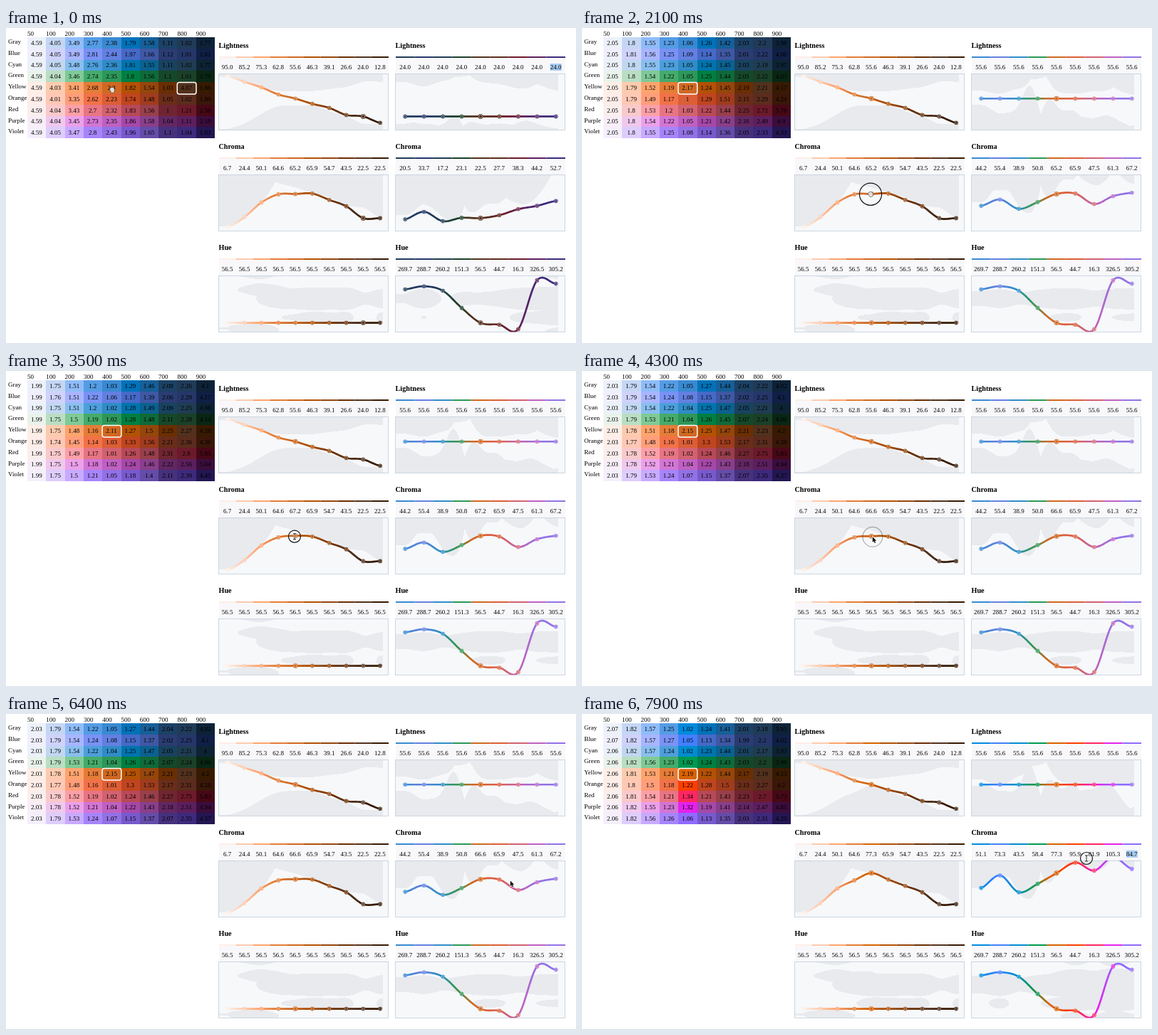
Write an HTML page with a canvas that moves like this. It is 800 by 443 pixels and loops after 8000 ms.

```html
<!DOCTYPE html>
<html lang="en">
<head>
<meta charset="utf-8">
<title>Palette editor</title>
<style>
html, body { margin: 0; width: 100%; height: 100%; overflow: hidden; background: #fff; }
canvas { display: block; width: 800px; height: 443px; }
</style>
</head>
<body>
<canvas id="stage" width="800" height="443"></canvas>
<script>
const LOOP = 8000;
const ctx = document.getElementById('stage').getContext('2d');
const shade = document.createElement('canvas');
shade.width = 800;
shade.height = 443;
const shadeCtx = shade.getContext('2d');

const names = ['Gray', 'Blue', 'Cyan', 'Green', 'Yellow', 'Orange', 'Red', 'Purple', 'Violet'];
const steps = [50, 100, 200, 300, 400, 500, 600, 700, 800, 900];
const light = [95, 85.2, 75.3, 62.8, 55.6, 46.3, 39.1, 26.6, 24, 12.8];
const hues = [269.7, 288.7, 260.2, 151.3, 56.5, 44.7, 16.3, 326.5, 305.2];
const yellow = [6.7, 24.4, 50.1, 64.6, 65.2, 65.9, 54.7, 43.5, 22.5, 22.5];
const mid = [44.2, 55.4, 38.9, 50.8, 65.2, 65.9, 47.5, 61.3, 67.2];
const dark = [20.5, 33.7, 17.2, 23.1, 22.5, 27.7, 38.3, 44.2, 52.7];

const charts = [
  { title: 'Lightness', max: 100 },
  { title: 'Chroma', max: 100 },
  { title: 'Hue', max: 360 }
];
const TABLE = { x: 30, y: 13, w: 26.3, h: 15.8 };
const PITCH = 141.8, WIDTH = 238, HEIGHT = 79.6;

const mix = (a, b, p) => a + (b - a) * p;
const clamp = (v, lo, hi) => Math.min(hi, Math.max(lo, v));
const ramp = (t, a, b) => clamp((t - a) / (b - a), 0, 1);
const ease = p => p * p * (3 - 2 * p);

function track(keys, t) {
  const i = keys.findIndex(k => k[0] > t);
  if (i < 0) return keys[keys.length - 1].slice(1);
  if (!i) return keys[0].slice(1);
  const a = keys[i - 1], b = keys[i], p = ease(ramp(t, a[0], b[0]));
  return a.slice(1).map((v, j) => mix(v, b[j + 1], p));
}

// CIE LCH (D65) to linear sRGB
function linear(l, c, h) {
  const rad = h * Math.PI / 180;
  const inv = f => f > 6 / 29 ? f * f * f : (f - 4 / 29) * 108 / 841;
  const fy = (l + 16) / 116;
  const x = 0.95047 * inv(fy + c * Math.cos(rad) / 500);
  const y = inv(fy);
  const z = 1.08883 * inv(fy - c * Math.sin(rad) / 200);
  return [
    3.2406 * x - 1.5372 * y - 0.4986 * z,
    -0.9689 * x + 1.8758 * y + 0.0415 * z,
    0.0557 * x - 0.204 * y + 1.057 * z
  ];
}

const encode = lch => linear(...lch).map(v => {
  v = clamp(v, 0, 1);
  return v <= 0.0031308 ? 12.92 * v : 1.055 * v ** (1 / 2.4) - 0.055;
});
const css = lch => `rgb(${encode(lch).map(v => Math.round(v * 255))})`;
const shown = lch => linear(...lch).every(v => v > -0.0001 && v < 1.0001);

// Brightness relative to white
function luma(lch) {
  const [r, g, b] = encode(lch);
  return (0.2126 * r + 0.7152 * g + 0.0722 * b - 0.008) / 0.992;
}

// Highest chroma that sRGB can show
function maxChroma(l, h) {
  let lo = 0, hi = 150;
  for (let i = 0; i < 16; i++) {
    const c = (lo + hi) / 2;
    if (shown([l, c, h])) lo = c;
    else hi = c;
  }
  return lo;
}
const limits = hues.map(h => maxChroma(light[4], h));

// Catmull-Rom value at fractional index u
function spline(v, u) {
  const last = v.length - 1;
  u = clamp(u, 0, last);
  const i = Math.min(Math.floor(u), last - 1), p = u - i;
  const a = v[i], b = v[i + 1];
  const m = (b - (v[i - 1] ?? a)) / 2, n = ((v[i + 2] ?? b) - a) / 2;
  return a + p * (m + p * (3 * (b - a) - 2 * m - n + p * (2 * (a - b) + m + n)));
}

function text(s, x, y, align = 'center', font = '9px') {
  ctx.font = `${font} "Liberation Serif", serif`;
  ctx.textAlign = align;
  ctx.textBaseline = 'alphabetic';
  ctx.fillStyle = '#000';
  ctx.fillText(s, x, y);
}

function stateAt(t) {
  const sel = t < 250 ? 8 : 4;
  const pull = 44 * ease(ramp(t, 6600, 7850));
  // Yellow chroma and the selection's contrast with white
  const [tuned, picked] = track([
    [2150, 65.2, 2.17], [3300, 67.2, 2.11], [3700, 67.2, 2.11],
    [4200, 66.6, 2.15], [6600, 66.6, 2.15], [7850, 66.6, 2.19]
  ], t);
  const white = sel === 8 ? 4.87 : picked;
  const live = mid.map((v, r) => Math.min((r === 4 ? tuned : v) + pull, limits[r]));
  const chroma = (r, c) => {
    if (c === 4) return live[r];
    if (r === 4) return yellow[c];
    if (c > 7) return dark[r] * (c > 8 ? 0.8 : 1);
    const v = mid[r] * yellow[c] / yellow[4];
    return c === 7 ? (v + dark[r]) / 2 : v;
  };
  const lch = (r, c) => [light[c], chroma(r, c), hues[r]];
  const ratio = (r, c) => {
    if (r === 4 && c === sel) return white;
    const v = luma(lch(r, c)) * white;
    return Math.max(v, 1 / v);
  };
  const sides = [
    { x: 299, pts: steps.map((_, c) => lch(4, c)), sel },
    { x: 547, pts: names.map((_, r) => lch(r, sel)), sel: 4 }
  ];
  return { sel, lch, ratio, sides, marked: t < 250 || pull > 0, key: sel + live.join() };
}

function drawTable(s) {
  const { x: left, y: top, w, h } = TABLE;
  steps.forEach((n, c) => text(n, left + c * w, 10.7, 'left'));
  names.forEach((name, r) => {
    const y = top + r * h;
    text(name, 3, y + 9, 'left');
    steps.forEach((_, c) => {
      const x = left + c * w;
      ctx.fillStyle = css(s.lch(r, c));
      ctx.fillRect(Math.round(x), Math.round(y), Math.round(x + w) - Math.round(x), Math.round(y + h) - Math.round(y));
      text(String(+s.ratio(r, c).toFixed(2)), x + 12.8, y + 10.8);
    });
  });
  ctx.strokeStyle = '#fff';
  ctx.lineWidth = 1.5;
  ctx.beginPath();
  ctx.roundRect(left + s.sel * w - 0.1, top + 4 * h + 0.2, w + 0.4, h + 0.8, 3);
  ctx.stroke();
}

// Keep neighbouring hues on the short way round
const unwrap = list => list.reduce((out, h, i) => {
  if (i) h -= 360 * Math.round((h - out[i - 1]) / 360);
  return [...out, h];
}, []);

let shadeKey;
// Grey out every value that sRGB cannot show
function drawShade(s) {
  if (shadeKey === s.key) return;
  shadeKey = s.key;
  shadeCtx.clearRect(0, 0, 800, 443);
  shadeCtx.fillStyle = '#e8eaee';
  for (const side of s.sides) {
    const w = WIDTH / side.pts.length;
    const series = [0, 1, 2].map(k => side.pts.map(p => p[k]));
    series[2] = unwrap(series[2]);
    for (let x = 0; x < WIDTH - w / 2 + 3; x++) {
      const at = series.map(v => spline(v, x / w - 0.5));
      charts.forEach((chart, i) => {
        const probe = [...at], top = Math.round(64.6 + i * PITCH);
        let start = -1;
        for (let y = 0; y <= 79; y++) {
          probe[i] = chart.max * (1 - y / 79);
          const out = y < 79 && !shown(probe);
          if (out && start < 0) start = y;
          if (!out && start >= 0) {
            shadeCtx.fillRect(side.x + x, top + start, 1, y - start);
            start = -1;
          }
        }
      });
    }
  }
}

function drawChart(side, chart, i, marked) {
  const { x, pts } = side, n = pts.length, w = WIDTH / n;
  const top = 64.3 + i * PITCH, edge = Math.round(top);
  const vals = pts.map(p => p[i]);
  const px = k => x + (k + 0.5) * w;
  const py = v => top + HEIGHT * (1 - v / chart.max) - 0.4;
  const colors = pts.map(css);

  text(chart.title, x - 0.5, top - 36.3, 'left', 'bold 10.2px');
  ctx.fillStyle = '#f8f8fa';
  ctx.fillRect(x, edge - 22, WIDTH, 22);
  colors.forEach((c, k) => {
    ctx.fillStyle = c;
    ctx.fillRect(x + k * w, edge - 24, w, 2);
  });
  if (marked) {
    ctx.fillStyle = '#a8cdf3';
    ctx.fillRect(px(n - 1) - 8, top - 14.3, 16, 10);
  }
  vals.forEach((v, k) => text(v.toFixed(1), px(k) - 0.2, top - 6.2));

  ctx.fillStyle = '#f6f8fa';
  ctx.fillRect(x, edge, WIDTH, 80);
  ctx.drawImage(shade, x, edge, WIDTH, 80, x, edge, WIDTH, 80);
  ctx.strokeStyle = '#ccd6e0';
  ctx.lineWidth = 1;
  ctx.strokeRect(x - 0.5, edge + 0.5, WIDTH, 79);

  ctx.save();
  ctx.beginPath();
  ctx.rect(x, top, WIDTH, HEIGHT);
  ctx.clip();
  const grad = ctx.createLinearGradient(px(0), 0, px(n - 1), 0);
  colors.forEach((c, k) => grad.addColorStop(k / n, c));
  ctx.strokeStyle = grad;
  ctx.lineWidth = 2.7;
  ctx.beginPath();
  for (let u = 0; u <= n - 0.99; u += 0.05) ctx.lineTo(px(u), py(spline(vals, u)));
  ctx.stroke();
  vals.forEach((v, k) => {
    const r = k === side.sel ? 3.4 : 2.8;
    ctx.fillStyle = colors[k];
    ctx.beginPath();
    ctx.arc(px(k), py(v), r, 0, 7);
    ctx.fill();
    ctx.strokeStyle = 'rgba(255,255,255,.55)';
    ctx.lineWidth = 0.9;
    ctx.beginPath();
    ctx.arc(px(k), py(v), r - 1, 0, 7);
    ctx.stroke();
  });
  ctx.restore();
}

function glyph(d, x, y, fill, stroke, width) {
  const path = new Path2D(d);
  ctx.save();
  ctx.translate(x, y);
  ctx.lineWidth = width;
  ctx.strokeStyle = stroke;
  ctx.stroke(path);
  if (fill) {
    ctx.fillStyle = fill;
    ctx.fill(path);
  }
  ctx.restore();
}

function drawRing(t, x, y) {
  for (const [down, up] of [[2050, 4200], [6500, 9000]]) {
    if (t < down || t > up + 150) continue;
    const fade = ramp(t, up, up + 150);
    ctx.globalAlpha = 1 - fade;
    ctx.strokeStyle = '#111';
    ctx.lineWidth = 1.2;
    ctx.beginPath();
    ctx.arc(x, y, mix(18, 8.5, ramp(t, down, down + 200)) + 8 * fade, 0, 7);
    ctx.stroke();
    ctx.globalAlpha = 1;
  }
}

function drawCursor(t) {
  const [x, y] = track([
    [250, 149, 87], [1100, 346, 217], [1950, 405, 233.7], [2150, 405, 233.7],
    [3300, 405, 232.7], [3700, 405, 232.7], [4250, 405, 233.2], [5150, 710.5, 241],
    [6350, 707.8, 234], [6600, 708, 238], [7850, 708, 203]
  ], t);
  drawRing(t, x, y);
  if (t < 350 || (t > 1850 && t < 2250)) {
    glyph('M-3 0Q-4-2-2-2Q-2-4 0-3Q2-4 2-2Q4-2 3 1Q3 4 0 4Q-2 3-3 0Z', x, y, '#ddd', '#222', 1);
  } else if ((t > 2250 && t < 4250) || t > 6550) {
    const d = 'M0-4V4M-2-4H2M-2 4H2';
    glyph(d, x, y, null, '#fff', 2.2);
    glyph(d, x, y, null, '#222', 1);
  } else {
    glyph('M0 0V7.5L1.8 6L3 8.8L4.3 8.2L3.1 5.5H5.3Z', x, y, '#000', '#fff', 1.2);
  }
}

function frame(now) {
  const t = now % LOOP, s = stateAt(t);
  ctx.fillStyle = '#fff';
  ctx.fillRect(0, 0, 800, 443);
  drawTable(s);
  drawShade(s);
  s.sides.forEach((side, j) => charts.forEach((chart, i) => {
    const marked = s.marked && j === 1 && i === (s.sel === 8 ? 0 : 1);
    drawChart(side, chart, i, marked);
  }));
  drawCursor(t);
}

const begin = performance.now();
function loop() {
  frame(performance.now() - begin);
  requestAnimationFrame(loop);
}
loop();
</script>
</body>
</html>
```
